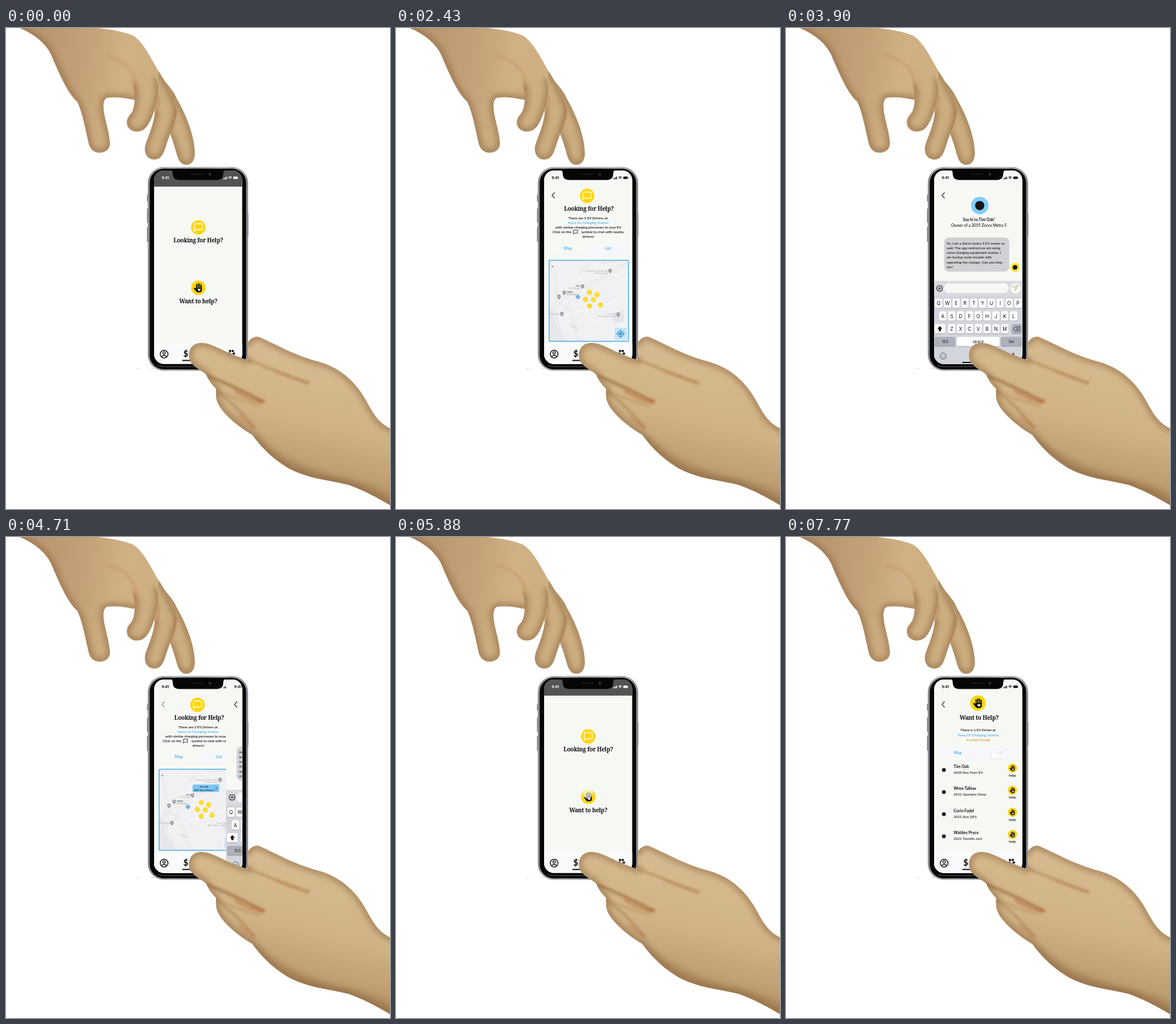
Animation, 669 px wide and 837 px high, one loop 8 s. Source, as an HTML page:

```html
<!DOCTYPE html>
<html lang="en">
<head>
<meta charset="utf-8">
<title>Charging help app</title>
<style>
html, body { margin: 0; width: 100%; height: 100%; overflow: hidden; background: #fff; }
svg { display: block; width: 100vw; height: 100vh; }
text { font-family: Lato, "Open Sans", sans-serif; fill: #111; }
.head { font: 700 10px "Noto Serif", serif; letter-spacing: -.25px; }
.sys { font-family: Inter, Roboto, sans-serif; }
</style>
</head>
<body>
<svg id="stage" viewBox="0 0 669 837" preserveAspectRatio="none"></svg>
<script>
const LOOP = 8000, W = 154;
const YELLOW = '#ffd60a', BLUE = '#4aaeea';

const text = (x, y, s, size, o = {}) =>
  `<text x="${x}" y="${y}" font-size="${size}" font-weight="${o.w || 600}" class="${o.c || ''}"
    text-anchor="${o.a || 'middle'}" style="fill:${o.fill || '#111'}">${s}</text>`;
const rect = (x, y, w, h, fill, r = 0, more = '') =>
  `<rect x="${x}" y="${y}" width="${w}" height="${h}" rx="${r}" fill="${fill}" ${more}/>`;
const dot = (x, y, r, fill, more = '') => `<circle cx="${x}" cy="${y}" r="${r}" fill="${fill}" ${more}/>`;
const line = (d, color, width, more = '') =>
  `<path d="${d}" fill="none" stroke="${color}" stroke-width="${width}" stroke-linecap="round" stroke-linejoin="round" ${more}/>`;
const use = (id, x, y, k = 1) => `<use href="#${id}" transform="translate(${x} ${y}) scale(${k})"/>`;
const pin = (x, y) => `<path d="M${x} ${y + 4}C${x - 5} ${y - 1} ${x - 3} ${y - 4} ${x} ${y - 4}S${x + 5} ${y - 1} ${x} ${y + 4}Z" fill="#8d9196"/>`
  + dot(x, y - 1, 1.1, '#fff');

// Skin part: base fill plus a soft inner shade along its outline.
const part = (id, d, fill, shade = d, width = 13) => `
  <clipPath id="${id}"><path d="${d}"/></clipPath>
  <path d="${d}" fill="url(#${fill})"/>
  <g clip-path="url(#${id})">${line(shade, '#8a633c', width, 'filter="url(#soft)" opacity=".5"')}</g>`;
const crease = (d, color, width, opacity) => line(d, color, width, `filter="url(#fine)" opacity="${opacity}"`);

const grad = (id, x1, y1, x2, y2, ...colors) =>
  `<linearGradient id="${id}" gradientUnits="userSpaceOnUse" x1="${x1}" y1="${y1}" x2="${x2}" y2="${y2}">`
  + colors.map((c, i) => `<stop offset="${i / (colors.length - 1)}" stop-color="${c}"/>`).join('') + '</linearGradient>';

const defs = `<defs>
  ${grad('skinA', 60, 60, 270, 90, '#bb976f', '#c3a077', '#d0b084', '#cdae81')}
  ${grad('skinB', 480, 560, 430, 780, '#d7ba8f', '#d0b286', '#b59367')}
  ${grad('steel', 246, 0, 422, 0, '#8b8d91', '#dadbdd', '#b9babd', '#e2e3e5', '#85878b')}
  <filter id="soft" x="-30%" y="-30%" width="160%" height="160%"><feGaussianBlur stdDeviation="5"/></filter>
  <filter id="fine" x="-50%" y="-50%" width="200%" height="200%"><feGaussianBlur stdDeviation="2"/></filter>
  <clipPath id="glass">${rect(258, 248, 153.5, 336.5, '#000', 17)}</clipPath>
  <clipPath id="mapClip">${rect(267, 405, 138, 140, '#000')}</clipPath>
  <g id="chat">${dot(0, 0, 12.6, YELLOW)}${line('M-7 6.8V-5Q-7-6.5-5.500-6.5H5.5Q7-6.5 7-5V2.5Q7 4 5.5 4H-4Z', '#fff', 1.3)}</g>
  <g id="hand">${dot(0, 0, 12.6, YELLOW)}
    ${line('M-3-5.2V1M-.2-7V1M2.6-6.5V1M5.3-4.3V1', '#111', 1.9)}
    <path d="M-3.9 0H6.2V4Q6.2 8 2 8H-.5Q-3 8-4.5 5.5L-8 1Q-7-1-5 .6L-3.9 1.6Z" fill="#111"/>
    <path d="M1.5 6L-1 3.4Q-1.4 1.4.4 1.6L1.5 2.5 2.6 1.6Q4.4 1.4 4 3.4Z" fill="#fff"/></g>
  <g id="tiny">${dot(0, 0, 4.4, YELLOW)}${line('M-2 2V-2H2V1H-1Z', '#fff3a0', .6)}</g>
</defs>`;

const status = color => text(277.5, 263, '9:41', 6.2, { w: 700, c: 'sys', fill: color })
  + [0, 1, 2, 3].map(i => rect(378.5 + i * 1.8, 261.5 - i, 1.2, 1.8 + i, color, .3)).join('')
  + line('M388 260Q390.5 257.8 393 260M389.3 261.6Q390.5 260.6 391.7 261.6', color, 1.1)
  + rect(396, 258.6, 7.6, 4.2, color, 1.2) + rect(404, 260, .7, 1.5, color);

const tabBar = rect(258, 549, W, 36, '#f9fafc')
  + dot(275.5, 567.5, 6.8, 'none', 'stroke="#111" stroke-width="1.5"')
  + dot(275.5, 565.5, 2.2, 'none', 'stroke="#111" stroke-width="1.3"')
  + line('M271 571.8Q275.5 567.8 280 571.8', '#111', 1.3)
  + text(313.3, 572.3, '$', 14.5, { w: 800 })
  + [[389, 566.5], [390.3, 562], [395, 562], [397, 566.5], [393, 569]].map(p => dot(...p, 2.1, '#111')).join('')
  + rect(307, 577.6, 57, 2, '#111', 1);

const paper = rect(257, 247, 156, 340, '#f6f8f4');
const back = line('M276 286.5L271.7 291.3L276 296', '#222', 1.2);
const tabs = y => rect(335, y - 11, 69, 19, '#f6f7fa', 3)
  + text(299.5, y, 'Map', 7.2, { fill: BLUE }) + text(369.5, y, 'List', 7.2, { fill: BLUE });

const home = paper + rect(257, 247, 156, 29, '#555254') + status('#fff')
  + use('chat', 335, 347) + text(335, 372.8, 'Looking for Help?', 10, { c: 'head' })
  + use('hand', 335, 452) + text(335, 478.8, 'Want to help?', 10, { c: 'head' }) + tabBar;

const gray = { a: 'end', fill: '#a3a6aa', w: 400 };
const mapBase = rect(266.7, 404.2, 138.4, 141, '#f1f1f4', 1)
  + `<g clip-path="url(#mapClip)">
  <path d="M267 480L283 500 280 520 298 545H267Z" fill="#e7e8eb"/>
  <path d="M377 500L396 490 397 510 382 514Z" fill="#e3e4e8"/>`
  + ['M268 408Q284 445 278 488T318 545', 'M266 488Q292 468 320 455T406 407', 'M276 480Q306 480 310 515T345 548',
     'M300 404Q330 440 330 480T400 520', 'M340 404Q362 428 406 438', 'M296 500Q340 488 406 470'].map((d, i) =>
      line(d, i < 3 ? '#e2e3e7' : '#f7f7f9', i < 3 ? 4.5 : 2) + (i < 3 ? line(d, '#f5f5f7', 2) : '')).join('')
  + line('M318 426L339 407M358 409L382 406M292 495L302 478', '#c9cbcf', .7, 'stroke-dasharray="3 1"')
  + '</g>' + [[373, 423], [325, 450], [293, 461], [284, 468], [289, 498], [387, 499]].map(p => pin(...p)).join('')
  + dot(272.5, 415, 1.8, '#aeb1b5')
  + text(369, 424, 'St Osmund Of Larkfold', 3.9, gray) + text(369, 428, 'Parish Church', 3.9, gray)
  + text(321, 450, 'Orlo', 3.9, { a: 'end', w: 700, fill: '#555' }) + text(321, 454, 'St 27 Region', 3.6, gray)
  + text(297, 461, 'VENO', 3.9, { a: 'start', w: 700, fill: '#555' }) + text(297, 465, 'St 30 Region', 3.6, { a: 'start', fill: '#999' })
  + text(383, 499, 'Larkin Rd', 3.9, gray) + text(383, 503, 'Recreation Center', 3.9, gray)
  + text(286, 499, 'Mill Lane Yard', 3.2, gray)
  + `<g transform="rotate(20 311 520)">${text(311, 521, 'Fernway Ave', 3.2, { fill: '#b5b8bc' })}</g>`
  + rect(381, 521.5, 21, 21, '#c3e5f8', 2)
  + dot(391.2, 532, 4.8, 'none', 'stroke="#3d91cf" stroke-width="1.4"') + dot(391.2, 532, 2.7, '#3d91cf')
  + line('M391.2 525V527M391.2 537V539M384.2 532H386.2M396.2 532H398.2', '#3d91cf', 1.3)
  + rect(266.7, 404.2, 138.4, 141, 'none', 1, `stroke="${BLUE}" stroke-width="1.5"`);
const spot = dot(317, 468, 4, '#cfe6f7') + dot(317, 468, 2.6, 'none', 'stroke="#3d8fd0" stroke-width="1"')
  + dot(317, 468, 1.2, '#3d8fd0') + line('M317 464V465M317 471V472M313 468H314M320 468H321', '#3d8fd0', .9);

const map = paper + status('#111') + back
  + `<g id="title">${use('chat', 333, 292)}${text(336, 318, 'Looking for Help?', 10, { c: 'head' })}</g>`
  + text(334.5, 332.6, 'There are 5 EV Drivers at', 6.2) + text(334.5, 340.8, 'Tansy Dr Charging Station', 6.3, { fill: BLUE })
  + text(335, 349, 'with similar charging processes to your EV', 6.2)
  + text(273, 357.2, 'Click on the', 6.2, { a: 'start' }) + text(397, 357.2, 'symbol to chat with nearby', 6.2, { a: 'end' })
  + line('M309 358.6V351.7H316.5V357H310.6Z', '#111', .8) + text(335, 365, 'drivers!', 6.2)
  + `<g id="tabs">${tabs(386.4)}</g>` + line('M268 394H402', '#eceef0', .6) + `<g id="mapBase">${mapBase}</g>`
  + `<g id="spot">${spot}</g><g id="dots">`
  + [[337, 460], [350, 464], [330, 472], [344, 473], [337, 484], [356, 482]].map(p => use('tiny', ...p)).join('') + '</g>'
  + `<g id="popup">${rect(325, 430.8, 46.5, 13, '#7cc6f5', 2.5)}${text(345, 436.2, 'Tim Oak', 4)}
     ${text(345, 441.8, '2019 Zorvo Metra 5', 4)}${line('M365.3 435L367.3 437.3L365.3 439.6', '#234', .8)}</g>` + tabBar;

const key = (x, y, w, s, fill = '#fff', size = 8.6) =>
  rect(x - w / 2, y - 7.6, w, 16.4, '#8f9299', 2.4) + rect(x - w / 2, y - 8.4, w, 16.4, fill, 2.4)
  + text(x, y + size * .36, s, size, { c: 'sys', w: 400 });
const keyRow = (s, x, y, step) => [...s].map((c, i) => key(x + i * step, y, 12.7, c)).join('');
const lines = ['Hi, I am a Zorvo metra 5 EV owner as', 'well. The app noticed we are using', 'same charging equipment nearby. I',
  'am having some trouble with', 'operating the charger. Can you help', 'me?'];

const chat = paper + status('#111') + back + dot(337.5, 309, 15.3, '#82cdfb') + dot(337.5, 309, 8, '#151515')
  + text(336, 336, 'Say hi to Tim Oak!', 6.9, { w: 700 }) + text(336, 345.6, 'Owner of a 2019 Zorvo Metra 5', 6.9, { w: 500 })
  + `<g id="bubble">${rect(275.5, 364.5, 113.5, 59.5, '#d1d1d5', 8)}`
  + lines.map((s, i) => text(280, 376.6 + i * 8.25, s, 6.2, { a: 'start', w: 500 })).join('')
  + dot(399, 416.5, 8, '#ffe438') + dot(399, 416.5, 4, '#151515') + '</g>'
  + rect(257, 440, 156, 148, '#d3d5dc') + rect(257, 440, 156, 26, '#dadbe0')
  + dot(267.5, 453, 5, 'none', 'stroke="#222" stroke-width="1.2"') + line('M265 453H270M267.5 450.5V455.5', '#222', 1.2)
  + rect(275, 444.5, 113, 16.5, '#f7f8f6', 8) + dot(400, 453, 9, '#fbfbf6', 'stroke="#f2e6b4" stroke-width="1"')
  + line('M394.5 450.5L404 448L400 457.5L398.4 453.2ZM398.4 453.2L404 448', '#9a9da3', .8)
  + keyRow('QWERTYUIOP', 265.8, 479.3, 15.35) + keyRow('ASDFGHJKL', 273.3, 501.5, 15.4) + keyRow('ZXCVBNM', 288.8, 523.6, 15.4)
  + key(268, 523.6, 18.5, '') + '<path d="M268 518.8L272.5 523.6H270V527.5H266V523.6H263.5Z" fill="#111"/>'
  + key(402, 523.6, 17, '', '#abb0ba') + line('M396.5 523.6L399.5 520H407V527.2H399.5ZM401.5 522L405 525.3M405 522L401.5 525.3', '#222', .8)
  + key(277, 545.8, 36, '123', '#abb0ba', 6.8) + key(334.7, 545.8, 74.5, 'space', '#fff', 6.8) + key(392.5, 545.8, 36, 'Go', '#abb0ba', 6.8)
  + dot(273.7, 571, 5.6, 'none', 'stroke="#5b5f66" stroke-width="1"') + dot(271.8, 569.5, .8, '#5b5f66') + dot(275.6, 569.5, .8, '#5b5f66')
  + line('M270.7 572.3Q273.7 576 276.7 572.3', '#5b5f66', .9)
  + rect(394.4, 565, 3.4, 7, '#5b5f66', 1.7) + line('M392.5 570Q396 576 399.6 570M396 574V576', '#5b5f66', .9)
  + rect(307, 581, 57, 2, '#111', 1);

const drivers = [['Tim Oak', '2020 Ruo Fenn EV'], ['Wren Tallow', '2021 Quendra Olvex'],
  ['Corin Fadel', '2021 Ruo QF6'], ['Walden Pryce', '2021 Tavrelle Junt']];
const help = paper + status('#111') + back + use('hand', 334.5, 289, 1.08)
  + text(336.5, 318, 'Want to Help?', 10, { c: 'head' }) + text(334.5, 338.4, 'There is 1 EV Driver at', 6.2)
  + text(334.5, 346.6, 'Tansy Dr Charging Station', 6.3, { fill: BLUE }) + text(335, 354.6, 'in need of help', 6.3, { fill: '#e58a2c' })
  + rect(265, 366, 70, 19, '#f6f7fa', 3) + tabs(377.6)
  + `<use href="#mapBase"/>${spot}${use('tiny', 344, 473)}<g id="list">${rect(257, 388, 156, 162, '#f6f8f4')}`
  + drivers.map(([name, car], i) => {
    const y = 401.8 + i * 38.5;
    return dot(275, y + 3.5, 3.4, '#1b1d24') + text(292, y, name, 7.1, { a: 'start', w: 700 })
      + text(292, y + 10, car, 6.2, { a: 'start', w: 500 }) + use('hand', 394.5, y + .3, .63) + text(394.3, y + 15, 'help', 6.5);
  }).join('') + '</g>' + tabBar;

const phone = `${rect(245.6, 290, 3, 12, '#8b8d91', 1)}${rect(245.6, 314, 3, 25, '#8b8d91', 1)}${rect(245.6, 346, 3, 26, '#8b8d91', 1)}
  ${rect(419.5, 322, 3, 41, '#a5a7aa', 1)}
  ${rect(247.6, 242.4, 173.6, 353.6, 'url(#steel)', 27, 'stroke="#77797d" stroke-width=".8"')}
  ${rect(250.3, 244.6, 168, 349.6, '#060607', 25)}
  ${line('M264 587.5Q270 589.3 284 589.3H390', '#5c5e62', 1)}
  ${line('M228 592.5H231M253 592.5H258', '#b9b9b9', .7)}
  <g clip-path="url(#glass)"><g>${home}</g><g id="mapScreen">${map}</g><g id="chatScreen">${chat}</g><g id="helpScreen">${help}</g>
  <circle id="tap" r="9" fill="#fff" stroke="#d6d6d6" stroke-width=".6"/></g>
  <path d="M286 245V247Q290.500 248 290.500 253Q290.500 264.500 302 264.500H367Q378.500 264.500 378.500 253Q378.500 248 383 247V245Z" fill="#060607"/>
  ${dot(355, 254.7, 2.6, '#1b1e26')}${dot(355.4, 254.4, 1, '#596077')}${rect(322, 253.3, 22, 2, '#17181b', 1)}`;

// Open outlines are shaded; the closing stretch joins the rest of the hand.
const third = 'M268 82C280 98 292 108 298 124C311 146 329 186 329 218C329 233 321 239 312 238C302 236 299 226 296 214C293 204 291 197 287 187';
const second = 'M265 74C276 90 292 120 297 140C299 155 289 175 284 190C277 206 276 228 259 229C246 229 239 217 243 203C247 190 255 175 259 150';
const wrist = 'M24 0C50 11 68 26 78 45C92 78 108 115 124 128C134 148 140 185 145 204C149 214 156 217 164 217C175 216 182 210 181 198C179 175 168 148 170 132C171 124 174 121 180 121C195 119 212 123 225 125';
const first = 'C262 140 252 165 243 174C237 181 222 183 215 175C208 167 210 157 217 150';
const upperHand = part('u3', third + 'L272 150Z', 'skinA', third)
  + part('u2', second + 'L255 90Z', 'skinA', second)
  + part('u1', wrist + 'L262 108L266 76C252 52 240 25 221 13C203 6 185 3 160 0Z', 'skinA', wrist)
  + part('u0', `M200 40C235 40 262 70 266 108${first}C226 140 227 110 217 88Z`, 'skinA', `M264 92L266 108${first}C226 140 227 115 223 102`)
  + crease('M174 48Q210 56 222 82Q227 100 225 120', '#b87c4c', 2.5, .45)
  + crease('M215 176Q208 164 218 150', '#c07a48', 2, .5)
  + crease('M262 152Q264 140 267 118', '#a8653a', 2.5, .6) + crease('M288 180Q296 160 296 140', '#a8653a', 2.5, .6);

const knuckles = 'M421 549C424 541 431 537 439 537C462 546 500 569 542 580C585 591 612 619 630 653C643 677 652 689 672 698';
const under = 'M672 832C648 818 625 805 597 795C562 786 528 785 492 766C462 748 443 727 429 708C405 694 383 675 373 660C364 646 366 638 366 628C358 620 352 612 349 603C340 596 325 588 321 580';
const thumb = 'C317 571 317 557 330 550C347 543 366 555 385 564C398 570 410 574 421 578';
const palm = knuckles + under.replace('M', 'L') + thumb + 'Z';
const lowerHand = part('l0', palm, 'skinB', knuckles + under + thumb)
  + `<g clip-path="url(#l0)">${crease('M421 577Q470 597 526 618', '#a67d4e', 4, .6)}
  ${crease('M470 598Q505 612 527 617', '#bf7a48', 3, .5)}
  ${crease('M348 604Q395 622 447 650', '#8f6238', 5, .65)}${crease('M400 632Q430 650 449 650', '#c06a38', 5, .55)}
  ${crease('M366 630Q395 645 442 657', '#a67a4b', 3, .45)}
  ${crease('M367 632Q400 655 432 695', '#9a6f42', 4, .45)}${crease('M408 676Q425 692 433 695', '#c47444', 4, .5)}
  ${line('M435 722Q500 775 590 795T669 832', '#8a633c', 20, 'filter="url(#soft)" opacity=".3"')}</g>`;

document.getElementById('stage').innerHTML = defs + upperHand + phone + lowerHand;

const $ = id => document.getElementById(id);
const clamp = v => Math.max(0, Math.min(1, v));
const ramp = (t, a, b) => clamp((t - a) / (b - a));
const easeOut = p => 1 - (1 - p) ** 2;
const shift = (id, x, y) => $(id).setAttribute('transform', `translate(${x} ${y})`);
const fade = (id, v) => $(id).setAttribute('opacity', v);

// Screen: slide-in start/end, slide-out start/end.
const slides = {
  mapScreen: [835, 1135, 5340, 5550],
  chatScreen: [3240, 3450, 4590, 4800],
  helpScreen: [6180, 6480, LOOP, LOOP + 1]
};
// Touch marker: time, x, y, opacity.
const touches = [[330, 336, 350, 0], [450, 336, 350, .6], [960, 336, 350, .6], [1050, 336, 350, 0],
  [2430, 347, 475, 0], [2520, 347, 475, .6], [2850, 347, 475, .6], [3000, 347, 475, 0],
  [4050, 400, 453, 0], [4140, 400, 453, .6], [4290, 400, 453, 0],
  [4380, 276, 291, 0], [4470, 276, 291, .6], [4680, 276, 291, .6], [4800, 276, 291, 0],
  [5130, 276, 291, 0], [5220, 276, 291, .7], [5430, 276, 291, .7], [5550, 276, 291, 0],
  [5760, 334, 446, 0], [5850, 334, 446, .6], [6240, 334, 446, .6], [6360, 334, 446, 0],
  [6960, 366, 378, 0], [7320, 366, 378, .75], [LOOP, 366, 378, .75]];

function draw(t) {
  for (const id in slides) {
    const [a, b, c, d] = slides[id];
    const x = W * (t < c ? 1 - easeOut(ramp(t, a, b)) : easeOut(ramp(t, c, d)));
    shift(id, x, 0);
    $(id).setAttribute('visibility', x < W ? 'visible' : 'hidden');
  }
  const open = ramp(t, 2640, 2790);
  fade('popup', open);
  shift('dots', 3 * open, 2 * open);
  shift('spot', 0, 1.5 * open);
  shift('tabs', 1.5 * open, -open);
  shift('title', .7 * open, 0);
  fade('bubble', ramp(t, 3570, 3840));
  fade('list', ramp(t, 7620, 7770));

  const i = touches.findIndex(k => k[0] > t);
  const next = touches[i], prev = touches[i - 1] || [0, 336, 350, 0];
  const p = ramp(t, prev[0], next[0]);
  const from = prev[3] ? prev : next;
  shift('tap', from[1], from[2]);
  fade('tap', prev[3] + (next[3] - prev[3]) * p);
}

const start = performance.now();
function tick() {
  draw((performance.now() - start) % LOOP);
  requestAnimationFrame(tick);
}
tick();
</script>
</body>
</html>
```
